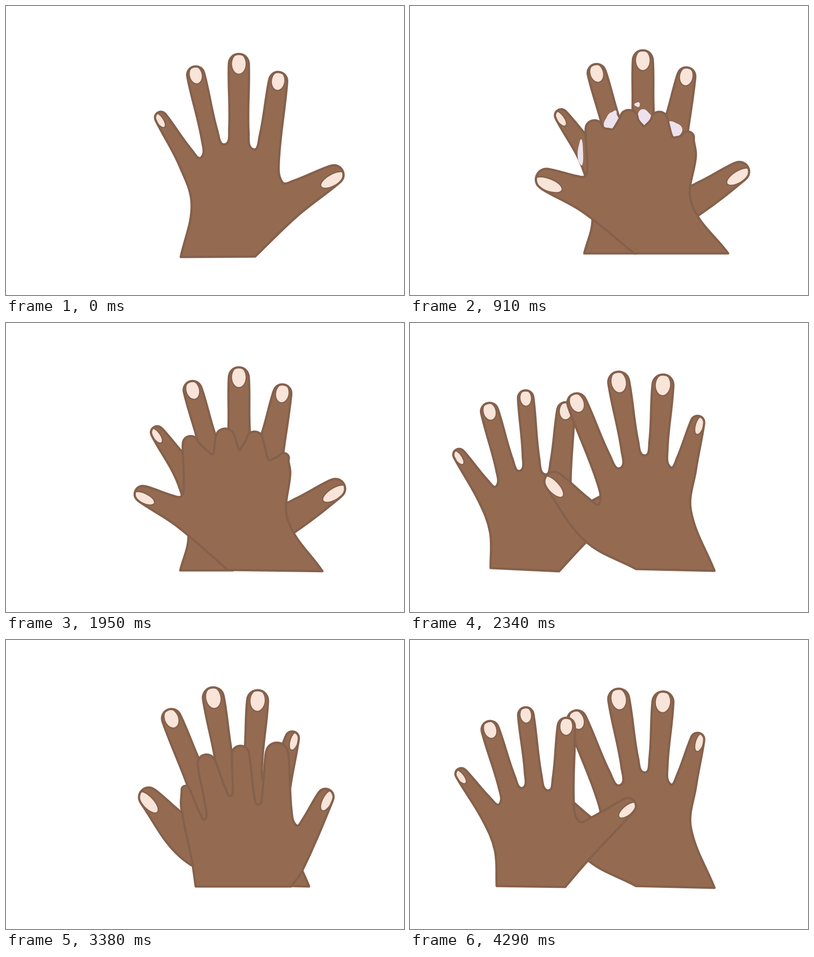
Write an HTML page with a canvas that moves like this. It is 877 by 639 pixels and loops after 4420 ms.

```html
<!DOCTYPE html>
<html lang="en">
<head>
<meta charset="utf-8">
<title>Washing hands</title>
<style>
html, body { margin: 0; width: 877px; height: 639px; overflow: hidden; background: #fff; }
canvas { display: block; }
</style>
</head>
<body>
<canvas id="stage" width="877" height="639"></canvas>
<script>
const ctx = document.getElementById('stage').getContext('2d');
const SKIN = '#946b51', LINE = '#85614c', NAIL = '#f8e4d9', FOAM = '#ece2ee';
const STEP = 130, STEPS = 34;

// A pose runs from the little finger to the thumb: wrist, waist, knuckle,
// then fingertips (x,y,radius) and the valleys between them, heel, wrist.
const pose = text => text.split(' ').map(p => p.split(',').map(Number));

const left = {
  open: pose('385,555 409,440 383,355 334,236,13 430,335 414,134,19 482,306 513,106,22 545,317 602,146,20 609,390 741,363,22 640,466 549,554'),
  under: pose('384,547 402,470 380,358 325,231,14 428,320 406,129,20 480,280 513,98,22 547,275 612,136,20 612,395 744,355,22 640,460 500,547'),
  crossed: pose('191,544 187,465 160,398 105,286,13 197,363 171,180,19 248,327 253,149,17 304,333 345,172,19 372,401 494,356,18 390,490 342,546'),
  laced: pose('432,546 444,490 405,390 387,326,10 447,390 438,229,13 490,336 512,184,19 548,336 597,207,19 617,412 728,330,22 645,503 592,545'),
  deep: pose('418,545 410,490 386,370 393,323,9 438,397 437,254,20 495,345 515,234,19 556,364 597,227,25 640,410 712,331,18 652,512 628,545')
};
const right = {
  open: pose('671,548 619,415 630,325 638,206,15 574,319 559,114,23 517,293 456,108,23 463,321 360,157,21 417,400 303,335,22 386,482 498,544'),
  soapy: pose('701,547 620,435 630,330 616,278,15 580,291 550,234,19 516,266 484,230,21 446,273 403,253,20 386,376 279,375,24 380,455 494,547'),
  rinsed: pose('697,549 621,435 626,330 617,290,12 580,305 548,241,19 514,282 482,234,22 456,292 404,250,18 386,384 286,370,18 378,450 488,546')
};

const mix = (a, b, t) => a.map((p, i) => p.map((v, j) => v + (b[i][j] - v) * t));
const wave = x => (1 - Math.cos(x * Math.PI)) / 2;
const along = (p, d, n) => [p[0] + d[0] * n, p[1] + d[1] * n];
const dist = (a, b) => Math.hypot(b[0] - a[0], b[1] - a[1]);
const unit = (a, b) => [(b[0] - a[0]) / dist(a, b), (b[1] - a[1]) / dist(a, b)];

function smooth(pts) {
  const path = new Path2D();
  const slope = i => unit(pts[Math.max(i - 1, 0)], pts[Math.min(i + 1, pts.length - 1)]);
  path.moveTo(...pts[0]);
  for (let i = 1; i < pts.length; i++) {
    const reach = dist(pts[i - 1], pts[i]) * 0.36;
    path.bezierCurveTo(...along(pts[i - 1], slope(i - 1), reach),
      ...along(pts[i], slope(i), -reach), ...pts[i]);
  }
  path.closePath();
  return path;
}

// Side of a finger just above a valley, set back to round the gap.
function arm(valley, shoulder, away) {
  const length = dist(valley, shoulder);
  return along(along(valley, unit(valley, shoulder), length * 0.2), away, length * 0.045);
}

function build(keys) {
  const side = Math.sign(keys[13][0] - keys[0][0]);
  const pts = keys.slice(0, 3), nails = [];
  for (let i = 0; i < 5; i++) {
    const [a, tip, b] = keys.slice(2 + 2 * i, 5 + 2 * i), r = tip[2];
    const dir = unit([(a[0] + b[0]) / 2, (a[1] + b[1]) / 2], tip);
    const across = [-dir[1] * side, dir[0] * side];
    const mid = along(tip, dir, -r), arc = [];
    for (let k = -2; k <= 2; k++) {
      const turn = k * Math.PI / 4;
      arc.push(along(along(mid, across, r * Math.sin(turn)), dir, r * Math.cos(turn)));
    }
    if (i > 0) pts.push(arm(a, arc[0], across));
    pts.push(...arc);
    if (i < 4) pts.push(arm(b, arc[4], along([0, 0], across, -1)));
    pts.push(b);

    const outer = i === 0 ? -1 : i === 4 ? 1 : 0;   // outer nails are seen from the side
    const [x, y] = along(along(mid, across, outer * 0.4 * r), dir, outer ? -0.3 * r : 0);
    const nail = new Path2D();
    nail.ellipse(x, y, r * (outer ? 0.52 : 0.68), r * (outer ? 1.3 : 0.98),
      Math.atan2(dir[0], -dir[1]), 0, 2 * Math.PI);
    nails.push(nail);
  }
  pts.push(keys[13]);
  return { body: smooth(pts), nails };
}

function draw(keys, dx = 0, dy = 0, thumbNailOnly = false) {
  const { body, nails } = build(keys);
  ctx.save();
  ctx.translate(dx, dy);
  ctx.lineJoin = 'round';
  ctx.strokeStyle = LINE;
  ctx.fillStyle = SKIN;
  ctx.fill(body);
  ctx.save();
  ctx.clip(body);
  ctx.fillStyle = NAIL;
  ctx.lineWidth = 6;
  for (const nail of thumbNailOnly ? nails.slice(4) : nails) {
    ctx.stroke(nail);
    ctx.fill(nail);
  }
  ctx.restore();
  ctx.lineWidth = 5;
  ctx.stroke(body);
  ctx.restore();
}

function blob(x, y, rx, ry) {
  ctx.beginPath();
  for (let a = 0; a < 2 * Math.PI; a += 0.1) {
    const r = 1 + 0.12 * Math.sin(3 * a + x);
    ctx.lineTo(x + rx * r * Math.cos(a), y + ry * r * Math.sin(a));
  }
  ctx.fill();
}

function drawFoam() {
  ctx.fillStyle = FOAM;
  for (const valley of [4, 6, 8]) {
    const [x, y] = right.soapy[valley];
    blob(x, y - 16, 18, 20);
  }
  blob(376, 325, 6, 28);
  blob(451, 236, 5, 5);
  blob(501, 218, 6, 5);
}

function tilted(angle, x, y, paint) {
  ctx.save();
  ctx.translate(x, y);
  ctx.rotate(angle);
  ctx.translate(-x, -y);
  paint();
  ctx.restore();
}

function scene(n) {
  if (n < 5) {                       // right hand arrives
    draw(left.open);
    if (n) draw(right.open, 40 * (4 - n));
  } else if (n < 16) {               // rubbing over the back of the hand
    draw(left.under);
    if (n > 5 && n < 11) drawFoam();
    draw(mix(right.soapy, right.rinsed, wave((n - 7) * 0.6)), 0, 0, true);
  } else if (n < 20) {               // left hand moves aside
    const dx = n < 18 ? -45 * (n - 15) : 0;
    tilted(0.035, 250 + dx, 160, () => draw(left.crossed, dx));
    draw(right.open);
  } else if (n === 20 || n > 29) {   // left hand crosses in front
    draw(right.open);
    draw(left.crossed, n === 20 ? 0 : 82 * (33 - n));
  } else {                           // fingers laced, then sliding off
    const depth = n < 26 ? wave((n - 22) / 4) : 1;
    draw(right.open, -3, -3);
    draw(mix(left.laced, left.deep, depth), 65 * Math.max(0, n - 27), 0, depth > 0.5);
  }
}

function tick() {
  ctx.fillStyle = '#fff';
  ctx.fillRect(0, 0, 877, 639);
  scene(Math.floor(performance.now() / STEP) % STEPS);
  requestAnimationFrame(tick);
}
tick();
</script>
</body>
</html>
```
